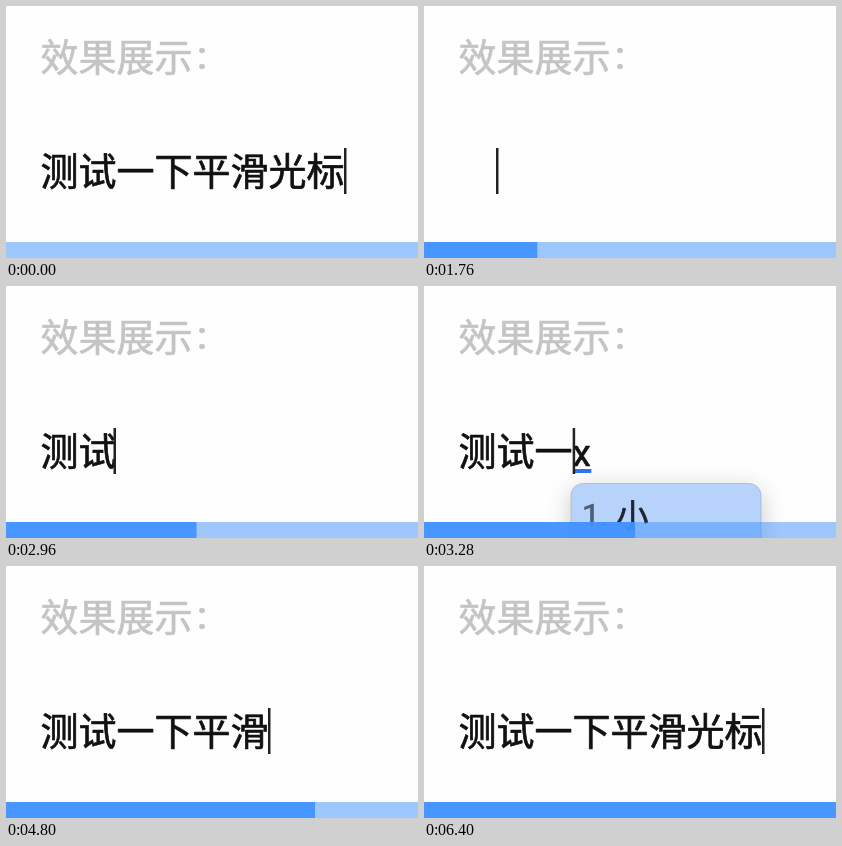
Recreate the animation shown at these times as an HTML page with a canvas. Size 412 by 252 pixels, loop 6.44 s.

```html
<!DOCTYPE html>
<html lang="zh-CN">
<head>
<meta charset="utf-8">
<title>平滑光标</title>
<style>
html, body { margin: 0; width: 100%; height: 100%; overflow: hidden; background: #fefefe; }
canvas { display: block; width: 412px; height: 252px; }
</style>
</head>
<body>
<canvas id="stage" width="412" height="252"></canvas>
<script>
const W = 412, H = 252, LOOP = 6440, STEP = 40;
const LEFT = 34.5, EM = 38, GLIDE = 110;
const CJK = '"Noto Sans CJK SC", "Noto Sans CJK", sans-serif';
const LATIN = '37px Roboto, sans-serif';
const LINE = '测试一下平滑光标';
const ctx = document.getElementById('stage').getContext('2d');

// Each word: committed length before it, its length, keys, key times
// (the last one commits), the top candidates and the panel widths.
const words = [
  { at: 0, len: 2, keys: 'ceshi', times: [2440, 2550, 2630, 2710, 2790, 2870],
    picks: ['才', '测', '测试', '测试', '测试'], widths: [318, 190, 300, 300, 300] },
  { at: 2, len: 1, keys: 'yi', times: [2980, 3060, 3140], picks: ['一', '一'], widths: [190, 190] },
  { at: 3, len: 1, keys: 'xia', times: [3278, 3360, 3440, 3530],
    picks: ['小', '系', '下'], widths: [190, 190, 190] },
  { at: 4, len: 1, keys: 'ping', times: [3650, 3740, 3830, 3930, 4042],
    picks: ['平', '皮', '品', '平'], widths: [230, 190, 190, 190] },
  { at: 5, len: 1, keys: 'hua', times: [4240, 4340, 4440, 4560],
    picks: ['好', '湖', '滑'], widths: [190, 190, 190] },
  { at: 6, len: 1, keys: 'guang', times: [4940, 5060, 5160, 5270, 5370, 5510],
    picks: ['个', '古', '挂', '关', '光'], widths: [190, 190, 190, 190, 190] },
  { at: 7, len: 1, keys: 'biao', times: [5640, 5740, 5840, 5930, 6040],
    picks: ['不', '比', '标', '标'], widths: [190, 190, 190, 190] }
];

const endOf = n => LEFT + n * EM;

function latinWidth(s) {
  ctx.font = LATIN;
  return ctx.measureText(s).width;
}

function buildEvents() {
  const list = [{ time: -GLIDE, count: 8, keys: '', from: endOf(8), to: endOf(8) }];
  const push = (time, count, keys, from, extra) =>
    list.push({ time, count, keys, from, to: endOf(count) + latinWidth(keys), ...extra });

  // One press of backspace, then key repeat after a delay.
  for (let i = 0; i < 8; i++) {
    const time = i ? 1220 + (i - 1) * 90 : 700;
    push(time, 7 - i, '', endOf(8 - i));
  }
  for (const w of words) {
    w.times.forEach((time, i) => {
      if (i === w.keys.length) {
        push(time, w.at + w.len, '', endOf(w.at));
      } else {
        const from = endOf(w.at) + latinWidth(w.keys.slice(0, i));
        push(time, w.at, w.keys.slice(0, i + 1), from, { pick: w.picks[i], width: w.widths[i] });
      }
    });
  }
  return list;
}

// The thin outline gives a weight between regular and medium.
function text(s, x, y, font, color, weight = 0.7) {
  ctx.font = font;
  ctx.fillStyle = ctx.strokeStyle = color;
  ctx.lineWidth = weight;
  ctx.lineJoin = 'round';
  ctx.fillText(s, x, y);
  ctx.strokeText(s, x, y);
}

function rect(x, y, w, h, color) {
  ctx.fillStyle = color;
  ctx.fillRect(x, y, w, h);
}

function panel(x, width, pick) {
  ctx.save();
  ctx.shadowColor = 'rgba(0,0,0,.22)';
  ctx.shadowBlur = 24;
  ctx.shadowOffsetY = 6;
  ctx.fillStyle = '#b8d3fb';
  ctx.beginPath();
  ctx.roundRect(x, 197.5, width, 120, 12);
  ctx.fill();
  ctx.restore();
  ctx.strokeStyle = 'rgba(110,120,135,.3)';
  ctx.lineWidth = 1;
  ctx.stroke();
  text('1.', x + 11, 240, '32px Roboto, sans-serif', '#4f5e75');
  text(pick, x + 45.5, 241, '32px ' + CJK, '#1d2531');
}

const events = buildEvents();

function draw(t) {
  let now = events[0];
  for (const e of events) if (e.time <= t) now = e;
  const start = endOf(now.count);

  rect(0, 0, W, H, '#fefefe');
  const big = EM + 'px ' + CJK;
  text('效果展示', LEFT, 65, big, '#c4c4c4');
  text('：', endOf(4) + 1.5, 61.5, '32px ' + CJK, '#c4c4c4');
  text(LINE.slice(0, now.count), LEFT, 179, big, '#111');

  if (now.keys) {
    panel(start - 1.5, now.width, now.pick);
    text(now.keys, start, 179.5, LATIN, '#111', 0.5);
    rect(start + 0.5, 183, latinWidth(now.keys), 4, '#2f72ee');
  }

  const p = Math.min(1, (t - now.time) / GLIDE);
  const caret = now.from + (now.to - now.from) * p * (2 - p);
  rect(caret - 0.5, 142, 2.5, 46, '#222');

  rect(0, 236, W, 16, 'rgba(64,146,255,.5)');
  rect(0, 236, W * t / (LOOP - STEP), 16, 'rgba(64,146,255,.9)');
}

const begin = performance.now();
function tick() {
  const t = (performance.now() - begin) % LOOP;
  draw(Math.floor(t / STEP) * STEP);
  requestAnimationFrame(tick);
}
tick();
</script>
</body>
</html>
```
